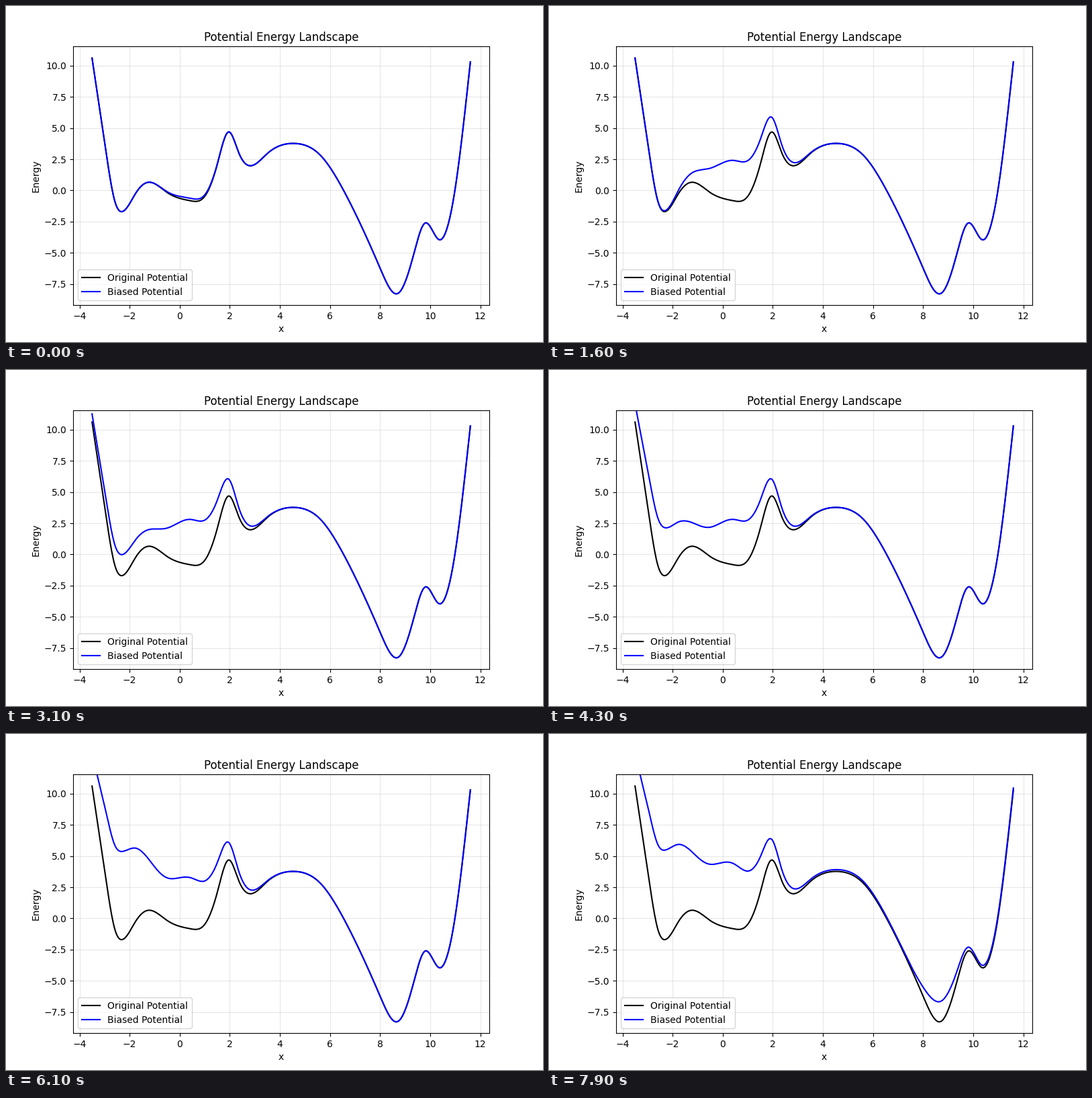
These frames come from a looping animation (800 px wide and 500 px high, 8 s). A matplotlib script:

```python
import numpy as np
import matplotlib.pyplot as plt
from matplotlib.animation import FuncAnimation

FRAMES = 80
INTERVAL = 100

# Wells, peaks and one shaping point on most slopes
KEYS = [(-3.5, 10.62), (-2.95, 3.2), (-2.6, -0.8), (-2.27, -1.68),
        (-1.75, -0.2), (-1.27, 0.65), (-0.5, -0.17), (0.43, -0.83),
        (1, -0.47), (1.5, 2.1), (1.95, 4.69), (2.35, 3.05), (2.72, 2.02),
        (3.5, 2.97), (4.57, 3.77), (5.6, 2.85), (6.5, 0.15), (8, -6.25),
        (8.72, -8.25), (9.3, -5.4), (9.79, -2.62), (10.35, -3.95),
        (10.95, -0.4), (11.6, 10.32)]

# Regions filled one after another: (end, height, centre, width)
FILLS = [(0, 0.2, 0.4, 0.6),
         (16, 3.05, 0.52, 1.04),
         (19, 0.4, 0.5, 1.1),
         (31, 1.62, -2.45, 0.78),
         (43, 2.2, -2.45, 0.74),
         (50, 1.42, -2.15, 0.95),
         (58, 1.8, -2.2, 0.93),
         (61, 0.45, -0.1, 1.0),
         (67, 1.22, 0, 1.05),
         (69, 0.15, 5.2, 1.9),
         (77, 1.57, 8.69, 0.53),
         (79, 0.2, 10.8, 1.0)]


def spline(x, keys):
    """Natural cubic spline through the key points."""
    kx, ky = np.array(keys).T
    h = np.diff(kx)
    slope = np.diff(ky) / h
    n = len(kx)
    a = np.eye(n)
    b = np.zeros(n)
    for i in range(1, n - 1):
        a[i, i - 1:i + 2] = h[i - 1], 2 * (h[i - 1] + h[i]), h[i]
        b[i] = 6 * (slope[i] - slope[i - 1])
    m = np.linalg.solve(a, b)
    i = np.clip(np.searchsorted(kx, x) - 1, 0, n - 2)
    t = x - kx[i]
    c1 = slope[i] - h[i] * (2 * m[i] + m[i + 1]) / 6
    return ky[i] + t * (c1 + t * (m[i] / 2 + t * (m[i + 1] - m[i]) / (6 * h[i])))


def bias(x, n):
    """Sum of Gaussian hills, each growing steadily during its own phase."""
    total = np.zeros_like(x)
    start = -1
    for end, height, centre, width in FILLS:
        grown = np.clip((n - start) / (end - start), 0, 1)
        total += grown * height * np.exp(-0.5 * ((x - centre) / width) ** 2)
        start = end
    return total


x = np.linspace(-3.5, 11.6, 500)
energy = spline(x, KEYS)

fig, ax = plt.subplots(figsize=(8, 5), dpi=100)
ax.plot(x, energy, color="black", label="Original Potential")
biased, = ax.plot(x, energy + bias(x, 0), color="blue", label="Biased Potential")
ax.set_xlim(-4.255, 12.355)
ax.set_ylim(-9.195, 11.562)
ax.set_title("Potential Energy Landscape")
ax.set_xlabel("x")
ax.set_ylabel("Energy")
ax.grid(alpha=0.3)
ax.legend(loc="lower left")


def update(n):
    biased.set_ydata(energy + bias(x, n))
    return biased,


anim = FuncAnimation(fig, update, frames=FRAMES, interval=INTERVAL,
                     repeat=True, repeat_delay=0)
plt.show()
```
